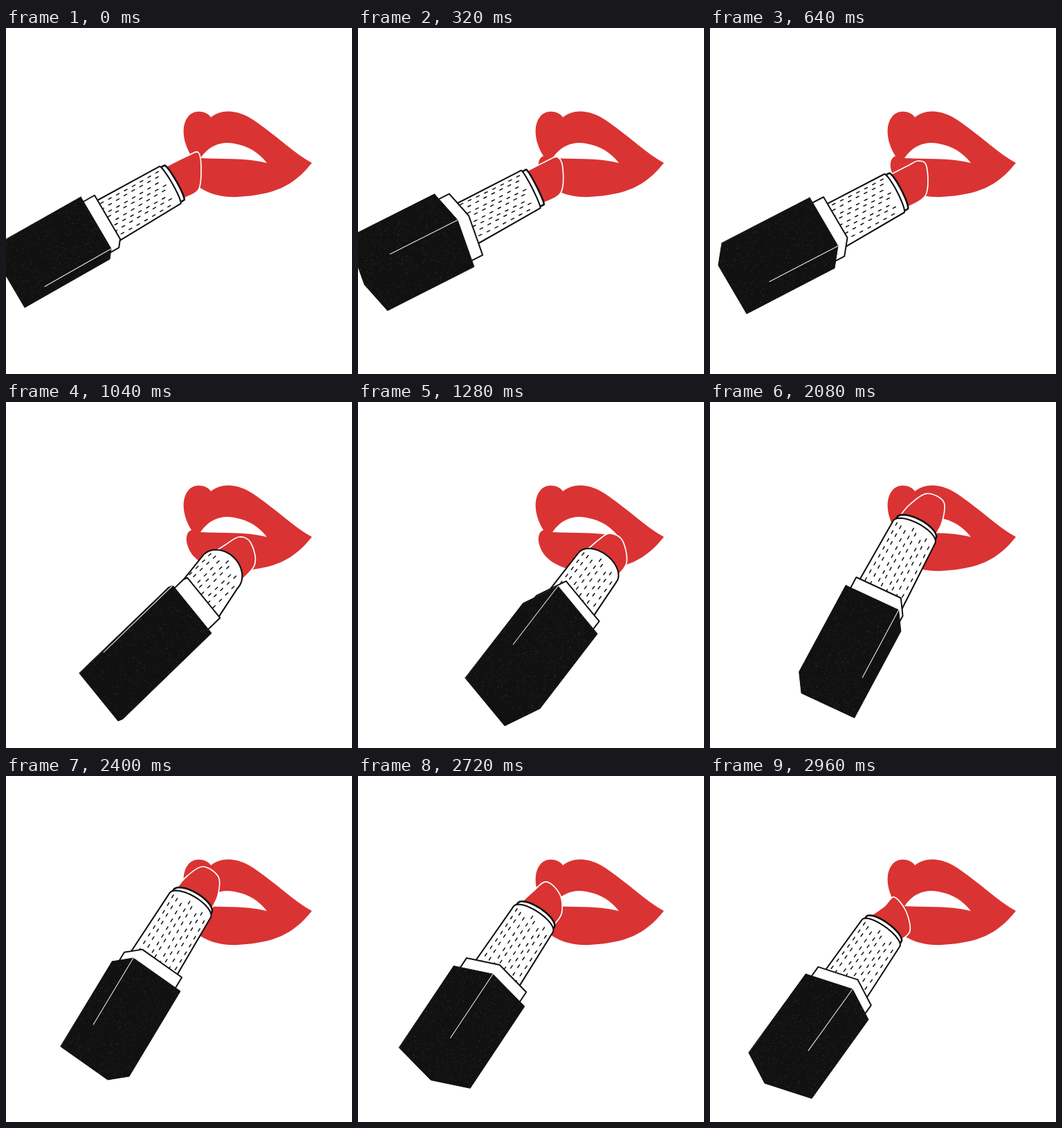
Write an HTML page with a canvas that moves like this. It is 500x500 px and loops after 3040 ms.

```html
<!DOCTYPE html>
<html lang="en">
<head>
<meta charset="utf-8">
<title>Lipstick</title>
<style>
html, body { margin: 0; width: 100%; height: 100%; overflow: hidden; background: #fff; }
canvas { display: block; width: 100vw; height: 100vh; }
</style>
</head>
<body>
<canvas id="stage" width="500" height="500"></canvas>
<script>
const ctx = document.getElementById('stage').getContext('2d');
const RED = '#da3333', INK = '#111', STEP = 80, FRAMES = 38;

// time, spin in degrees, case front corners (left, near, right),
// case length vector, barrel end, roundness of that end
const CASE = [
  [0, 39, 108, 244, 152, 319, 150, 334, -123, 70, 237, 227, 4],
  [640, 117, 144, 245, 185, 315, 180, 347, -127, 66, 266, 239, 5],
  [1040, 141, 234, 268, 241, 265, 297, 334, -128, 124, 310, 245, 28],
  [1280, 169, 238, 291, 289, 266, 346, 335, -83, 108, 346, 239, 22],
  [1760, 202, 218, 280, 288, 292, 323, 342, -64, 124, 325, 200, 14],
  [2400, 248, 153, 268, 184, 263, 252, 311, -74, 123, 266, 187, 14],
  [2960, 297, 138, 286, 206, 308, 229, 352, -82, 114, 247, 227, 11]
];
// outline of the red tip, left to right
const TIP = [
  [262, 185, 278, 180, 282, 204, 278, 234],
  [286, 199, 301, 192, 313, 200, 312, 241],
  [316, 207, 337, 195, 354, 204, 359, 236],
  [348, 199, 364, 190, 382, 200, 388, 233],
  [319, 163, 343, 146, 368, 156, 366, 188],
  [259, 147, 284, 131, 307, 146, 306, 173],
  [252, 188, 266, 175, 283, 195, 289, 224]
];

const add = (p, q, k = 1) => [p[0] + q[0] * k, p[1] + q[1] * k];
const mix = (p, j, q, k) => add([p[0] * j, p[1] * j], q, k);
const localSpin = deg => (deg - 90 * Math.round(deg / 90)) * Math.PI / 180;

// Turn corner points into centre, side and bulge vectors, so the case can spin.
const keys = CASE.map(([t, deg, ax, ay, mx, my, bx, by, ...rest], i) => {
  const f = localSpin(deg), c = Math.cos(f), s = Math.sin(f);
  const mid = [(ax + bx) / 2, (ay + by) / 2];
  const b = add([bx, by], mid, -1), m = add([mx, my], mid, -1);
  return { t, v: [deg, ...mid, ...mix(b, c, m, s), ...mix(m, c, b, -s), ...rest, ...TIP[i]] };
});

function pose(t) {
  let i = 0;
  while (i < keys.length - 2 && t >= keys[i + 1].t) i++;
  const k0 = keys[i], k1 = keys[i + 1], span = k1.t - k0.t;
  const before = keys[Math.max(i - 1, 0)], after = keys[Math.min(i + 2, keys.length - 1)];
  const u = (t - k0.t) / span;
  return k0.v.map((p, n) => {
    const q = k1.v[n];
    const d0 = (q - before.v[n]) / (k1.t - before.t) * span;
    const d1 = (after.v[n] - p) / (after.t - k0.t) * span;
    return p + u * d0 + u * u * (3 * (q - p) - 2 * d0 - d1) + u * u * u * (2 * (p - q) + d0 + d1);
  });
}

function trace(points, close = true) {
  ctx.beginPath();
  points.forEach(p => ctx.lineTo(...p));
  if (close) ctx.closePath();
}

function paint(fill, stroke, width) {
  if (fill) { ctx.fillStyle = fill; ctx.fill(); }
  if (stroke) { ctx.strokeStyle = stroke; ctx.lineWidth = width; ctx.stroke(); }
}

function smooth(pts) {
  ctx.beginPath();
  ctx.moveTo(...pts[0]);
  for (let i = 0; i < pts.length - 1; i++) {
    const a = pts[Math.max(i - 1, 0)], b = pts[i], c = pts[i + 1], d = pts[Math.min(i + 2, pts.length - 1)];
    ctx.bezierCurveTo(...add(b, add(c, a, -1), 1 / 6), ...add(c, add(d, b, -1), -1 / 6), ...c);
  }
}

function random(seed) {
  return () => (seed = (seed * 16807) % 2147483647) / 2147483647;
}

const lips = new Path2D('M442 195C415 180 390 155 362 136C335 116 311 117 296 129C289 119 272 118 264 127' +
  'C251 142 257 168 268 185C260 188 259 199 263 209C270 231 300 246 335 244C387 241 415 229 442 195Z');
const mouth = new Path2D('M281 188C295 168 312 164 330 167C351 171 364 179 377 195C345 187 310 190 281 188Z');

function draw(frame) {
  ctx.fillStyle = '#fff';
  ctx.fillRect(0, 0, 500, 500);
  ctx.lineJoin = ctx.lineCap = 'round';
  ctx.fillStyle = RED;
  ctx.fill(lips);
  ctx.fillStyle = '#fff';
  ctx.fill(mouth);

  const v = pose(frame * STEP), at = n => [v[n], v[n + 1]];
  const spin = localSpin(v[0]), c = Math.cos(spin), s = Math.sin(spin);
  const mid = at(1), side = at(3), bulge = at(5), back = at(7), end = at(9), round = v[11];
  const length = Math.hypot(...back), axis = [-back[0] / length, -back[1] / length];
  const r = 29.5 + Math.min(round, 14) * 0.36, half = [-axis[1] * r, axis[0] * r];
  const gap = 7 * Math.max(0, Math.min(1, (22 - round) / 8));
  const ring = add(end, axis, gap);
  const cap = (o, k) => Array.from({ length: 25 }, (_, i) => {
    const a = Math.PI * i / 24;
    return add(add(o, half, -k * Math.cos(a)), axis, k * round * Math.sin(a));
  });

  // red tip
  smooth([add(ring, half, -0.85), at(12), at(14), at(16), at(18), add(ring, half, 0.85)]);
  paint(RED, '#fff', 1.7);

  // ring and barrel
  if (gap > 0.5) {
    trace([add(end, half, -0.93), ...cap(ring, 0.93), add(end, half, 0.93)]);
    paint('#fff', INK, 2.6);
  }
  const base = add(mid, back, -0.1);
  trace([add(base, half, -1.08), ...cap(end, 1), add(base, half, 1.08)]);
  paint('#fff', INK, 2.1);
  ctx.save();
  ctx.clip();
  ctx.beginPath();
  const reach = Math.hypot(...add(end, base, -1)) + 20;
  for (let col = 0; col < 8; col++) {
    const x = -0.84 + col * 0.24;
    for (let d = 7 + col * 5 % 13; d < reach; d += 13) {
      const wobble = 0.03 * Math.sin(d + col * 4);
      const p = add(add(end, half, x + wobble), axis, round * Math.sqrt(1 - x * x) - d);
      ctx.moveTo(...p);
      ctx.lineTo(...add(p, axis, -4.5));
    }
  }
  paint(null, INK, 1.5);
  ctx.restore();

  // silhouette of a box whose near edge is the second point
  const box = (o, k, depth) => {
    const b = mix(side, c * k, bulge, -s * k), m = mix(side, s * k, bulge, c * k);
    const front = [add(o, b, -1), add(o, m), add(o, b)];
    const far = [add(o, b), add(o, m, -1), add(o, b, -1)];
    return [...front, ...far.map(p => add(p, back, depth))];
  };

  trace(box(add(mid, back, -0.135), 0.84, 0.15));
  paint('#fff', INK, 2);

  const body = box(mid, 1, 1);
  trace(body);
  paint(INK, INK, 1);
  ctx.save();
  ctx.clip();
  const rnd = random(frame * 977 + 31);
  ctx.fillStyle = 'rgba(255,255,255,.1)';
  for (let i = 0; i < 900; i++) {
    const p = add(add(mid, side, rnd() * 2.4 - 1.2), back, rnd() * 1.4 - 0.3);
    ctx.fillRect(...p, 1.2, 1.2);
  }
  ctx.restore();
  trace([body[1], add(body[1], back, 0.78)], false);
  paint(null, '#e8e8e8', 1.1);
}

let shown = -1;
const start = performance.now();
function tick() {
  const frame = Math.floor((performance.now() - start) / STEP) % FRAMES;
  if (frame !== shown) draw(shown = frame);
  requestAnimationFrame(tick);
}
tick();
</script>
</body>
</html>
```
